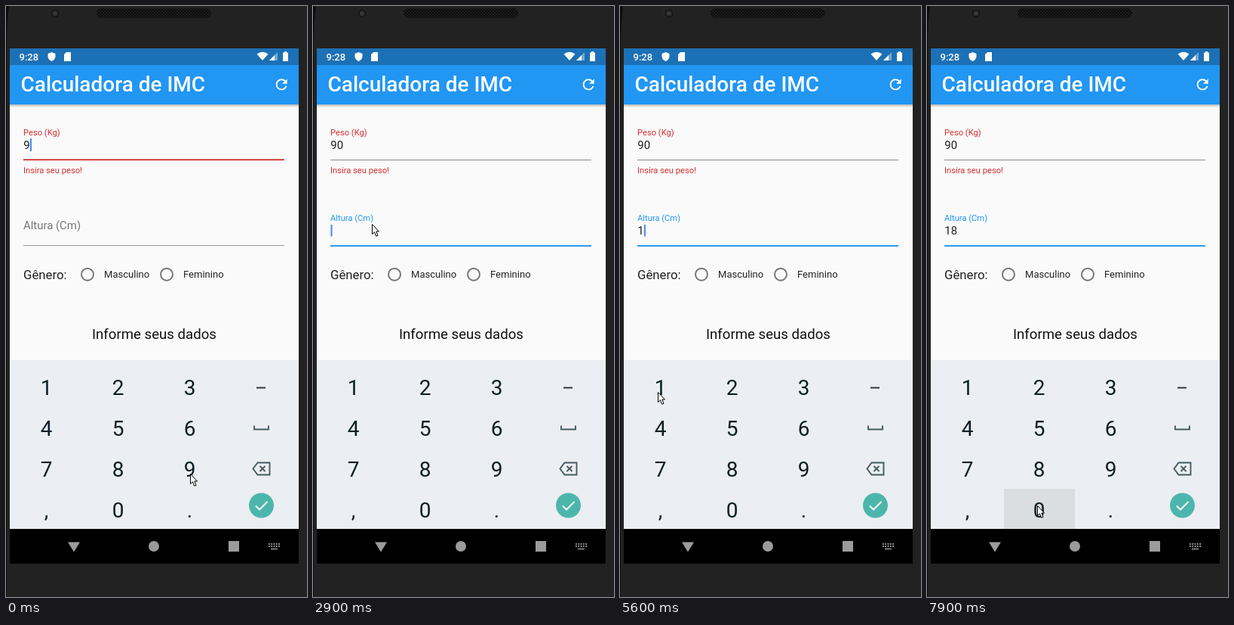
Animation, 399 px wide and 781 px high, one loop 8 s. Source, as an HTML page:

```html
<!DOCTYPE html>
<html lang="pt">
<head>
<meta charset="utf-8">
<style>
html, body { margin: 0; width: 100%; height: 100%; overflow: hidden; background: #222; }
svg { display: block; width: 399px; height: 781px; font-family: Roboto, sans-serif; }
.small { font-size: 11.18px; }
.input { font-size: 14.91px; fill: #212121; }
.option { font-size: 13.05px; fill: #212121; }
#keys { font-size: 28px; fill: #0a1e26; text-anchor: middle; }
</style>
</head>
<body>
<svg viewBox="0 0 399 781">
  <defs>
    <linearGradient id="shade" x2="0" y2="1">
      <stop stop-opacity=".28"/><stop offset="1" stop-opacity="0"/>
    </linearGradient>
    <pattern id="mesh" width="4" height="4" patternUnits="userSpaceOnUse">
      <circle cx="1" cy="1" r=".8" fill="#303030"/><circle cx="3" cy="3" r=".8" fill="#303030"/>
    </pattern>
  </defs>

  <!-- Phone body -->
  <rect width="399" height="781" fill="#222"/>
  <path d="M0 0H4Q1 20 1 56V781H0Z" fill="#0c0c0c"/>
  <circle cx="65" cy="10" r="7" fill="#1a1a1a" stroke="#2c2c2c"/>
  <circle cx="65" cy="10" r="3" fill="#34383a"/>
  <rect x="120" y="3" width="152" height="13" rx="6.5" fill="#0d0d0d"/>
  <rect x="120" y="3" width="152" height="13" rx="6.5" fill="url(#mesh)"/>

  <!-- Screen -->
  <rect x="5" y="56" width="383" height="681" fill="#fafafa"/>
  <rect x="5" y="130" width="383" height="4" fill="url(#shade)"/>
  <rect x="5" y="56" width="383" height="22" fill="#1c70b5"/>
  <rect x="5" y="78" width="383" height="52" fill="#2196f3"/>
  <g fill="#fff">
    <text x="17.5" y="72" font-size="13.05" font-weight="500">9:28</text>
    <path d="M60.5 61L65.500 63V67Q65 71 60.500 73Q56 71 55.500 67V63Z"/>
    <path d="M80 61H86V73H77V64Z"/>
    <path d="M332.500 63.500Q340 58 347.500 63.500L340 72Z"/>
    <path d="M360 61V72H349Z" opacity=".4"/>
    <path d="M356 65V72H349Z"/>
    <path d="M369 60H372V61.500H374V73H367V61.500H369Z"/>
    <text x="19.500" y="113" font-size="27.96" font-weight="500">Calculadora de IMC</text>
    <path transform="translate(354 92.600) scale(.932)" d="M17.650 6.350C16.200 4.900 14.210 4 12 4c-4.420 0-7.990 3.580-7.990 8s3.570 8 7.990 8c3.730 0 6.840-2.550 7.730-6h-2.080c-.820 2.330-3.040 4-5.650 4-3.310 0-6-2.690-6-6s2.690-6 6-6c1.660 0 3.140.690 4.220 1.780L13 11h7V4z"/>
  </g>

  <!-- Form -->
  <g class="small" fill="#d32f2f">
    <text x="23" y="170.500">Peso (Kg)</text>
    <text x="23" y="221">Insira seu peso!</text>
  </g>
  <text id="weight" class="input" x="23.300" y="188.500"></text>
  <rect id="weightLine" x="23" width="346"/>
  <text id="heightLabel" x="23"  >Altura (Cm)</text>
  <text id="height" class="input" x="23.300" y="302"></text>
  <rect id="heightLine" x="23" width="346"/>
  <rect id="caret" width="2" fill="#4285f4"/>
  <text x="23" y="360.500" font-size="16.78" fill="#212121">Gênero:</text>
  <g fill="none" stroke="#757575" stroke-width="1.900">
    <circle cx="108" cy="354.700" r="8"/><circle cx="213" cy="354.700" r="8"/>
  </g>
  <text class="option" x="130" y="359.300">Masculino</text>
  <text class="option" x="235" y="359.300">Feminino</text>
  <text x="196.500" y="439.500" font-size="18.64" text-anchor="middle" fill="#111">Informe seus dados</text>

  <!-- Keyboard -->
  <rect x="5" y="468" width="383" height="223" fill="#ebeef2"/>
  <rect id="pressed" width="94" height="53" fill="#dadee1"/>
  <g id="keys"></g>
  <g fill="none" stroke="#455a64" stroke-width="1.900">
    <path d="M332 504.500H344" stroke="#263238"/>
    <path d="M329 554.500V559.500H348V554.500"/>
    <path d="M333.500 603.500H349.500V619.500H333.500L327.500 611.500ZM336.500 608L343.500 615M343.500 608L336.500 615"/>
  </g>
  <circle cx="338.500" cy="660" r="16.500" fill="#4db6ac"/>
  <path d="M331 660.500L336 665.500L346.500 655" fill="none" stroke="#fff" stroke-width="2"/>

  <!-- Navigation -->
  <rect x="5" y="691" width="383" height="46"/>
  <g fill="#9b9b9b">
    <path d="M82 708.500H98L90 721.500Z"/>
    <circle cx="196" cy="714" r="7"/>
    <rect x="295" y="707" width="14" height="14"/>
  </g>
  <path d="M348 711H363M348 714H363" stroke="#9b9b9b" stroke-width="1.800" stroke-dasharray="1.800 1.500"/>
  <path d="M351 717.500H360" stroke="#9b9b9b" stroke-width="1.500"/>

  <path id="pointer" d="M.500.500V13.500L3.500 10.800L5.700 16.300L8 15.300L5.800 10H9.500Z" fill="#fff" stroke="#000"/>
</svg>
<script>
const LOOP = 8000;
const $ = id => document.getElementById(id);
const set = (id, attrs) => {
  for (const name in attrs) $(id).setAttribute(name, attrs[name]);
};

["123", "456", "789", ",0."].forEach((row, r) => {
  [...row].forEach((key, c) => {
    $("keys").innerHTML += `<text x="${53.5 + c * 95}" y="${514 + r * 54}">${key}</text>`;
  });
});

// Pointer moves: start, end, x, y
const moves = [
  [0, 0, 244, 618], [100, 600, 151, 667], [900, 1000, 150, 668],
  [1400, 2300, 78, 288], [3900, 4300, 72, 549], [4400, 4800, 51, 511],
  [4900, 5000, 50, 510], [5700, 6400, 138, 614], [6500, 6900, 146, 606],
  [7100, 7500, 146, 660]
];
const caretToggles = [500, 1000, 1800, 2300, 3100, 3700, 4200, 4700, 5200, 5500, 6000, 6600, 7500];
const ease = p => p * p * (3 - 2 * p);

function pointerAt(t) {
  let [, , x, y] = moves[0];
  for (const [start, end, toX, toY] of moves.slice(1)) {
    if (t <= start) break;
    const p = ease(Math.min(1, (t - start) / (end - start)));
    x += (toX - x) * p;
    y += (toY - y) * p;
  }
  return [Math.round(x), Math.round(y)];
}

function draw(t) {
  const onHeight = t >= 2900;
  const weight = t < 1300 ? "9" : "90";
  const height = t < 5500 ? "" : t < 7000 ? "1" : "18";
  $("weight").textContent = weight;
  $("height").textContent = height;

  set("weightLine", onHeight ? { y: 203, height: 1, fill: "#8a8a8a" } : { y: 202.3, height: 1.8, fill: "#d32f2f" });
  set("heightLine", onHeight ? { y: 316, height: 1.9, fill: "#2196f3" } : { y: 316, height: 1, fill: "#999" });
  set("heightLabel", onHeight
    ? { y: 284, "font-size": 11.18, fill: "#2196f3" }
    : { y: 294.5, "font-size": 14.91, fill: "#777" });

  const typed = onHeight ? height : weight;
  set("caret", {
    x: 23.5 + typed.length * 8.4,
    y: onHeight ? 289 : 175,
    height: onHeight ? 15.5 : 17,
    opacity: caretToggles.filter(at => at <= t).length % 2 ? 0 : 1
  });

  const one = t >= 5500 && t < 5600, zero = t >= 7900;
  set("pressed", { x: one ? 7 : 102, y: one ? 476 : 638, opacity: one || zero ? 1 : 0 });
  set("pointer", { transform: `translate(${pointerAt(t)})` });
}

// The screen refreshes in steps of 100 ms
function tick() {
  draw(Math.floor(performance.now() % LOOP / 100) * 100);
  requestAnimationFrame(tick);
}
tick();
</script>
</body>
</html>
```
